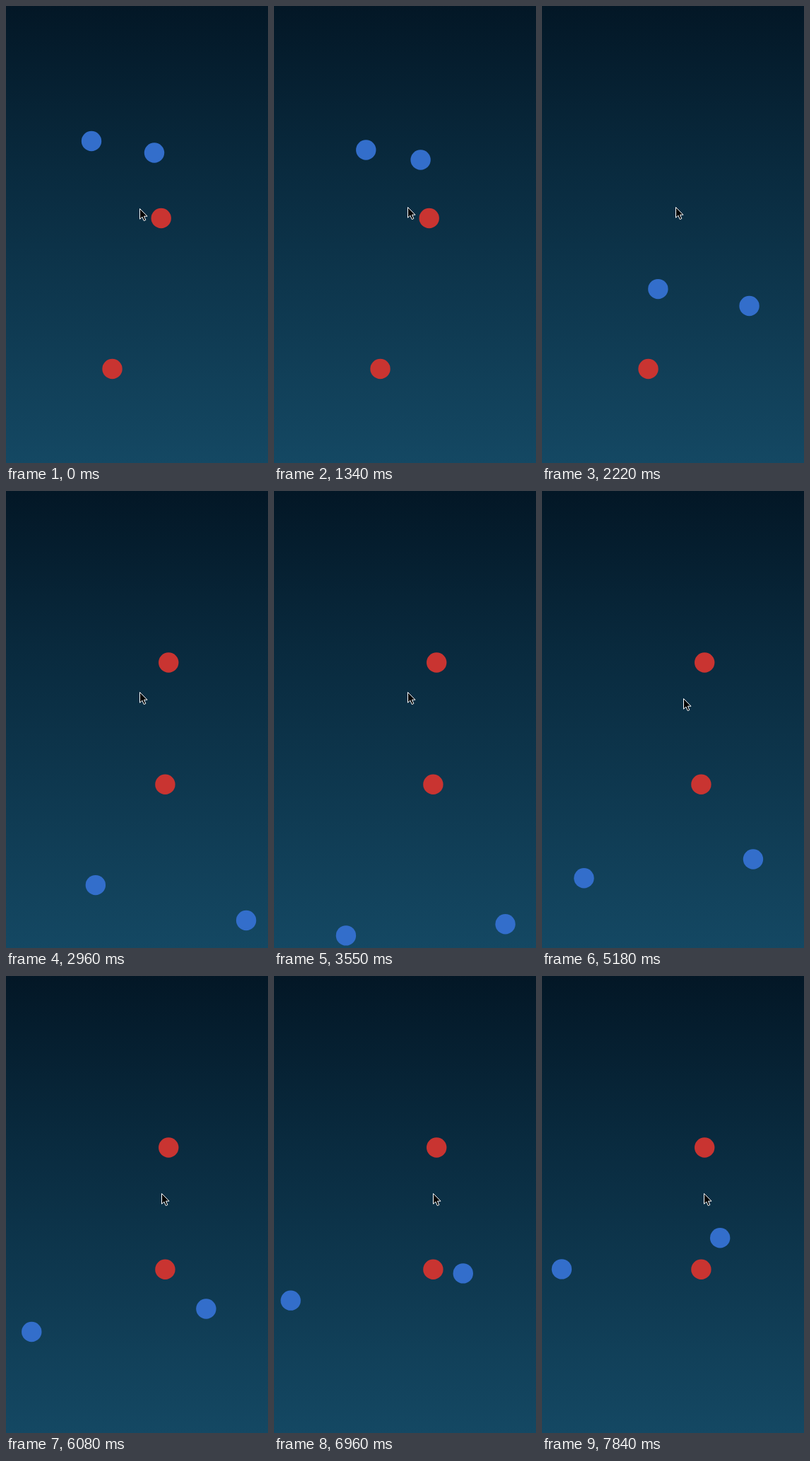
An HTML page with a canvas that plays this animation: 371x646 px, repeating every 7.99 s.

```html
<!DOCTYPE html>
<html lang="en">
<head>
<meta charset="utf-8">
<title>Marbles</title>
<style>
  html, body { margin: 0; width: 100%; height: 100%; overflow: hidden; background: #0c3149; }
  canvas { display: block; }
</style>
</head>
<body>
<canvas id="stage" width="371" height="646"></canvas>
<script>
const W = 371, H = 646, LOOP = 7990;
const START = 1340, STEP = 148, LAST = 44;   // ms, ms per step, steps
const RADIUS = 14.2, BLUE = '#336ecb', RED = '#c93431';
const LEFT = 22, RIGHT = 354.1, FLOOR = 638.5;
const SIDE_BOUNCE = 0.185, FLOOR_GRIP = 0.515;
const LAUNCH = -0.38, TOUCH = 1.69, PART = 3.05, DT = 0.01;

const ctx = document.getElementById('stage').getContext('2d');

// Velocities per step: at launch, while the balls push each other, after parting
const balls = [
  { x: 121, y: 191, bounce: 0.235, speeds: [[24.4, 32.8], [11, 35.7], [-7.5, 31.4]] },
  { x: 210, y: 207.5, bounce: 0.228, speeds: [[-6.3, 26.3], [11.8, 39.8], [27.3, 36.6]] }
];
const waves = [
  [{ x: 219.7, y: 300 }, { x: 150.5, y: 513 }],
  [{ x: 230.2, y: 242.5 }, { x: 225.4, y: 414.8 }]
];

function move(b) {
  b.x += b.vx * DT;
  b.y += b.vy * DT;
  if ((b.x < LEFT && b.vx < 0) || (b.x > RIGHT && b.vx > 0)) b.vx *= -SIDE_BOUNCE;
  if (b.y > FLOOR && b.vy > 0) {
    b.vy *= -b.bounce;
    b.vx *= FLOOR_GRIP;
  }
}

const touching = (a, b) => Math.hypot(a.x - b.x, a.y - b.y) < RADIUS * 2;

// Runs the game once and keeps a snapshot of every step
function play() {
  const shots = [];
  let reds = waves[0], phase = -1, wave = 0;
  const snap = () => shots.push({ reds, blues: balls.map(({ x, y }) => ({ x, y })) });
  snap();
  for (let i = Math.round(LAUNCH / DT); i <= LAST / DT; i++) {
    const n = i * DT;
    const now = n < TOUCH ? 0 : n < PART ? 1 : 2;
    if (i >= 0 && i % Math.round(1 / DT) === 0) snap();
    if (now !== phase) {
      phase = now;
      for (const b of balls) [b.vx, b.vy] = b.speeds[phase];
    }
    balls.forEach(move);
    reds = reds.filter(r => !balls.some(b => touching(r, b)));
    if (!reds.length && wave + 1 < waves.length) reds = waves[++wave];
  }
  return shots;
}

const shots = play();

const water = ctx.createLinearGradient(0, 0, 0, H);
water.addColorStop(0, 'rgb(3,23,38)');
water.addColorStop(0.35, 'rgb(9,42,62)');
water.addColorStop(1, 'rgb(20,72,99)');

function ball({ x, y }, color) {
  ctx.fillStyle = color;
  ctx.beginPath();
  ctx.arc(x, y, RADIUS, 0, Math.PI * 2);
  ctx.fill();
}

const arrow = new Path2D('M.5 .5V15.2L3.9 12.1L6.3 17.6L8.8 16.5L6.5 11.2H11Z');

function cursor(x, y) {
  ctx.save();
  ctx.translate(Math.round(x), Math.round(y));
  ctx.fillStyle = '#000';
  ctx.strokeStyle = '#fff';
  ctx.fill(arrow);
  ctx.stroke(arrow);
  ctx.restore();
}

const ramp = (v, from, to) => Math.min(1, Math.max(0, (v - from) / (to - from)));

function draw(t) {
  const n = t < START ? -1 : Math.min(LAST, Math.floor((t - START + 15) / STEP));
  const { reds, blues } = shots[n + 1];
  ctx.fillStyle = water;
  ctx.fillRect(0, 0, W, H);
  reds.forEach(r => ball(r, RED));
  blues.forEach(b => ball(b, BLUE));

  const lift = t < 140 ? 2 : t < 290 ? 1 : 0;
  cursor(189 + 31 * ramp(n, 22.5, 32) + 9 * ramp(n, 32, LAST),
         284 + lift + 23 * ramp(n, 22.5, 31));
}

const t0 = performance.now();
function tick() {
  draw((performance.now() - t0) % LOOP);
  requestAnimationFrame(tick);
}
tick();
</script>
</body>
</html>
```
